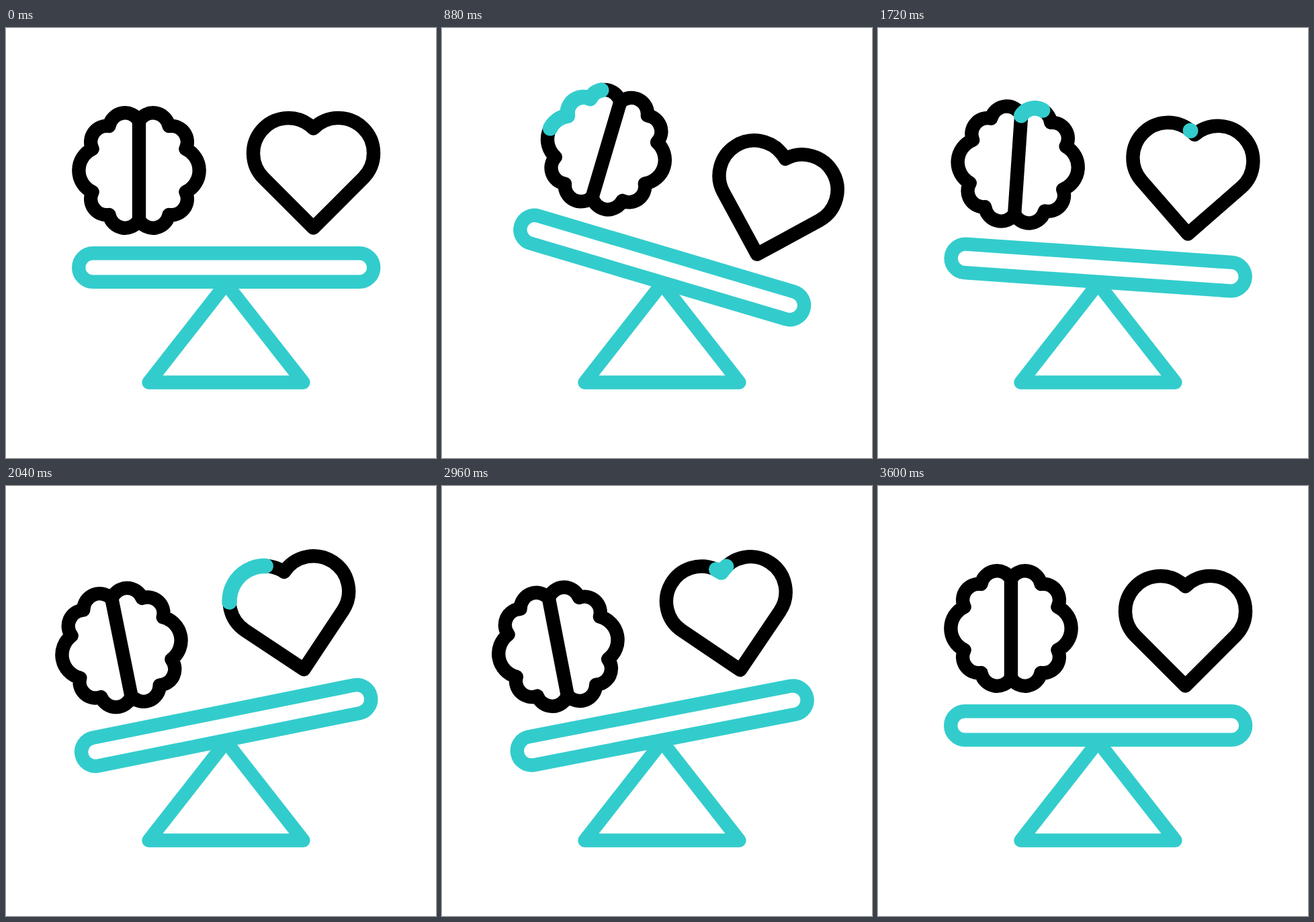
An HTML page that plays this animation: 640 by 640 pixels, repeating every 3.62 s.

```html
<!DOCTYPE html>
<html lang="en">
<head>
<meta charset="utf-8">
<title>Mind and heart in balance</title>
<style>
  html, body { margin: 0; width: 100%; height: 100%; overflow: hidden; background: #fff; }
  svg { display: block; width: 100%; height: 100%; }
  svg * { stroke-linecap: round; stroke-linejoin: round; }
  .ink { stroke: #000; }
  .glow { stroke-width: 22.5; }
</style>
</head>
<body>
<svg viewBox="0 0 640 640" fill="none" stroke="#33cccc" stroke-width="20.4">
  <defs>
    <path id="brain" pathLength="1" d="M198 138.5
      A24 24 0 0 0 153.5 146 A23.8 23.8 0 0 0 128.6 180 A35.4 35.4 0 0 0 128.6 244
      A23.8 23.8 0 0 0 153.5 278 A24 24 0 0 0 198 285.5
      A24 24 0 0 0 242.5 278 A23.8 23.8 0 0 0 267.4 244 A35.4 35.4 0 0 0 267.4 180
      A23.8 23.8 0 0 0 242.5 146 A24 24 0 0 0 198 138.5Z"/>
    <path id="heart" pathLength="1" d="M451 144
      A52.3 52.3 0 0 0 383 223 L457.5 297.5 L532 223
      A52.3 52.3 0 0 0 457.5 149.5 A52.3 52.3 0 0 0 451 144Z"/>
  </defs>
  <path d="M327.5 380.5 L212.5 527.5 H442.5Z"/>
  <g id="seesaw">
    <rect x="108.2" y="335.2" width="439" height="42.6" rx="21.3"/>
    <g class="ink">
      <use href="#brain"/>
      <path d="M198 138.5V285.5"/>
      <use href="#heart"/>
    </g>
    <use id="brainGlow" class="glow" href="#brain"/>
    <use id="heartGlow" class="glow" href="#heart"/>
  </g>
</svg>
<script>
  const LOOP = 3620, STEP = 1200, TILT = 20;
  const byId = id => document.getElementById(id);
  const seesaw = byId('seesaw'), brainGlow = byId('brainGlow'), heartGlow = byId('heartGlow');

  // Eased 0..1 progress of a move that begins at `start` and lasts one step
  const ease = (t, start) => {
    const s = Math.min(1, Math.max(0, (t - start) / STEP));
    return s * s * (3 - 2 * s);
  };

  // A dash runs once round the outline, its tail 200 ms behind its head
  function trace(el, t, start) {
    const head = ease(t, start), tail = ease(t, start + 200);
    el.style.visibility = head > tail ? 'visible' : 'hidden';
    el.style.strokeDasharray = `${head - tail} 2`;
    el.style.strokeDashoffset = -tail;
  }

  function draw(now) {
    const t = now % LOOP;
    const angle = TILT * (ease(t, 0) - 2 * ease(t, STEP) + ease(t, 2 * STEP));
    seesaw.setAttribute('transform', `rotate(${angle} 327.7 356.5)`);
    trace(brainGlow, t, 500);
    trace(heartGlow, t, 1700);
  }

  const origin = performance.now();
  function tick() {
    draw(performance.now() - origin);
    requestAnimationFrame(tick);
  }
  tick();
</script>
</body>
</html>
```
